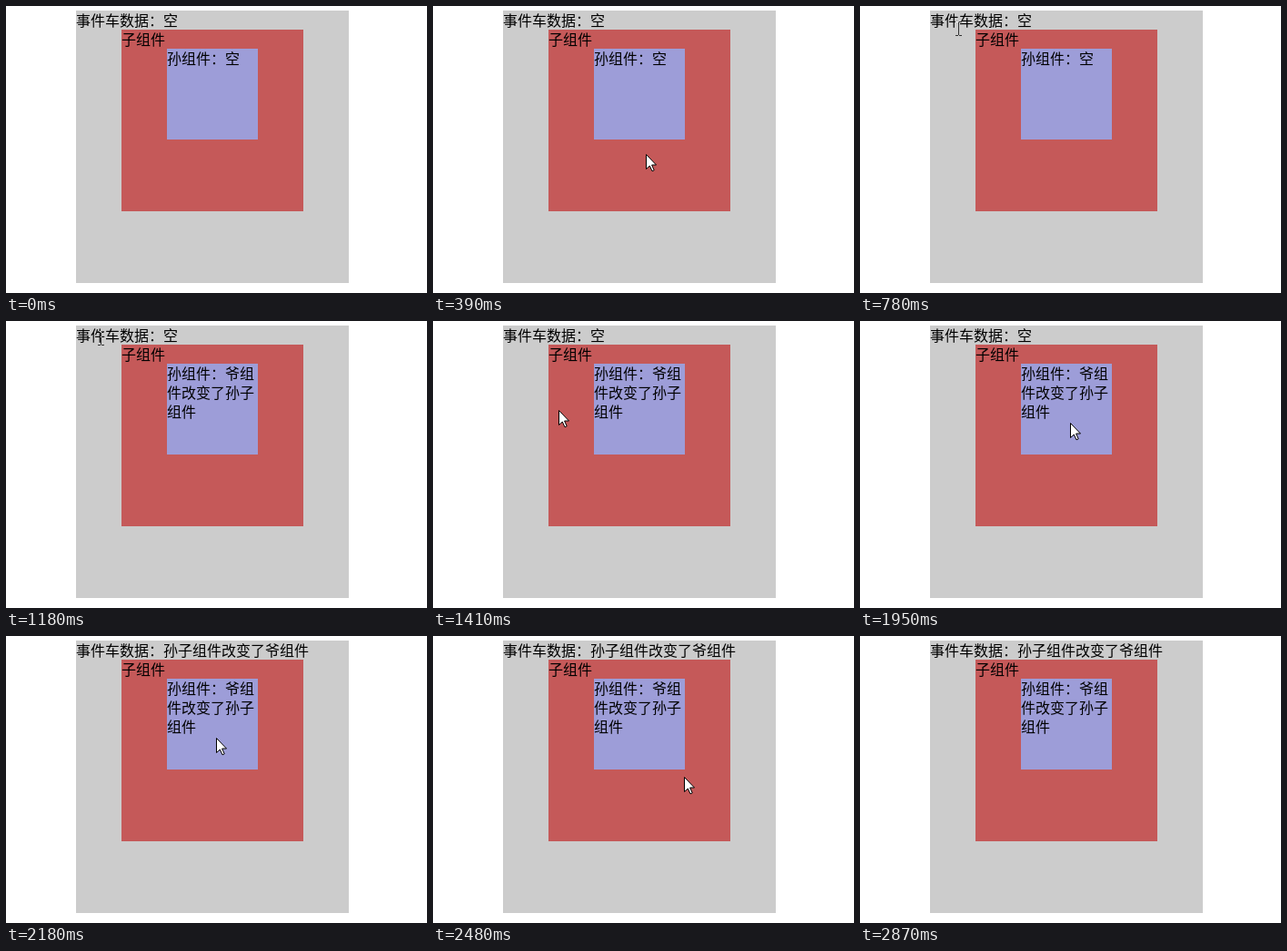
An HTML page that plays this animation: 463 by 316 pixels, repeating every 3.1 s.

```html
<!DOCTYPE html>
<html lang="zh-CN">
<head>
<meta charset="utf-8">
<title>组件通信</title>
<style>
  html, body {
    margin: 0;
    width: 100%;
    height: 100%;
    overflow: hidden;
    background: #fff;
  }
  body {
    position: relative;
    font: 16px/21px "Noto Sans CJK SC", "Noto Sans CJK", sans-serif;
    color: #000;
  }
  .parent {
    position: absolute;
    left: 77px;
    top: 5px;
    width: 300px;
    height: 300px;
    background: #ccc;
  }
  .child {
    width: 200px;
    height: 200px;
    margin-left: 50px;
    background: #c55959;
  }
  .grandchild {
    width: 100px;
    height: 100px;
    margin-left: 50px;
    background: #9d9dd8;
  }
  svg {
    position: absolute;
    left: 0;
    top: 0;
    visibility: hidden;
  }
  #beam { mix-blend-mode: difference; }
</style>
</head>
<body>
<div class="parent">事件车数据：<span id="outer">空</span>
  <div class="child">子组件
    <div class="grandchild">孙组件：<span id="inner">空</span></div>
  </div>
</div>
<svg id="arrow" width="13" height="20">
  <path d="M.5 .5V16.5L4.3 13 7 18.8 9.2 17.8 6.6 12H11.5Z" fill="#fff" stroke="#000"/>
</svg>
<svg id="beam" width="7" height="16" shape-rendering="crispEdges">
  <path d="M0 0h3v1h1v-1h3v1h-3v14h3v1h-3v-1h-1v1h-3v-1h3v-14h-3z" fill="#fff"/>
</svg>
<script>
  const LOOP = 3100;
  const INNER_AT = 1100;
  const OUTER_AT = 2100;
  const $ = id => document.getElementById(id);
  const cursors = { arrow: $("arrow"), beam: $("beam") };

  // time, cursor, left, top
  const steps = [
    [0, ""],
    [150, "arrow", 336, 298],
    [230, "arrow", 310, 262],
    [310, "arrow", 275, 214],
    [390, "arrow", 234, 163],
    [470, "arrow", 194, 114],
    [550, "arrow", 160, 72],
    [630, "beam", 134, 36],
    [700, "arrow", 118, 31],
    [780, "beam", 105, 17],
    [860, "beam", 96, 10],
    [940, "beam", 90, 6],
    [1020, "beam", 95, 8],
    [1100, "beam", 100, 10],
    [1180, "beam", 101, 11],
    [1250, "arrow", 111, 36],
    [1330, "arrow", 122, 62],
    [1410, "arrow", 138, 98],
    [1490, "arrow", 157, 136],
    [1560, "arrow", 179, 170],
    [1640, "arrow", 206, 194],
    [1720, "arrow", 238, 200],
    [1790, "arrow", 253, 178],
    [1870, "arrow", 244, 137],
    [1950, "arrow", 231, 112],
    [2480, "arrow", 276, 155],
    [2560, "arrow", 318, 193],
    [2640, "arrow", 361, 232],
    [2720, "arrow", 402, 269],
    [2790, "arrow", 433, 300],
    [2870, ""]
  ];

  function setText(id, text) {
    if ($(id).textContent !== text) $(id).textContent = text;
  }

  function draw() {
    const t = performance.now() % LOOP;
    const [, kind, x, y] = steps.findLast(step => step[0] <= t);
    for (const name in cursors) {
      const style = cursors[name].style;
      style.visibility = name === kind ? "visible" : "hidden";
      if (name === kind) style.transform = `translate(${x}px, ${y}px)`;
    }
    setText("inner", t < INNER_AT ? "空" : "爷组件改变了孙子组件");
    setText("outer", t < OUTER_AT ? "空" : "孙子组件改变了爷组件");
    requestAnimationFrame(draw);
  }
  draw();
</script>
</body>
</html>
```
